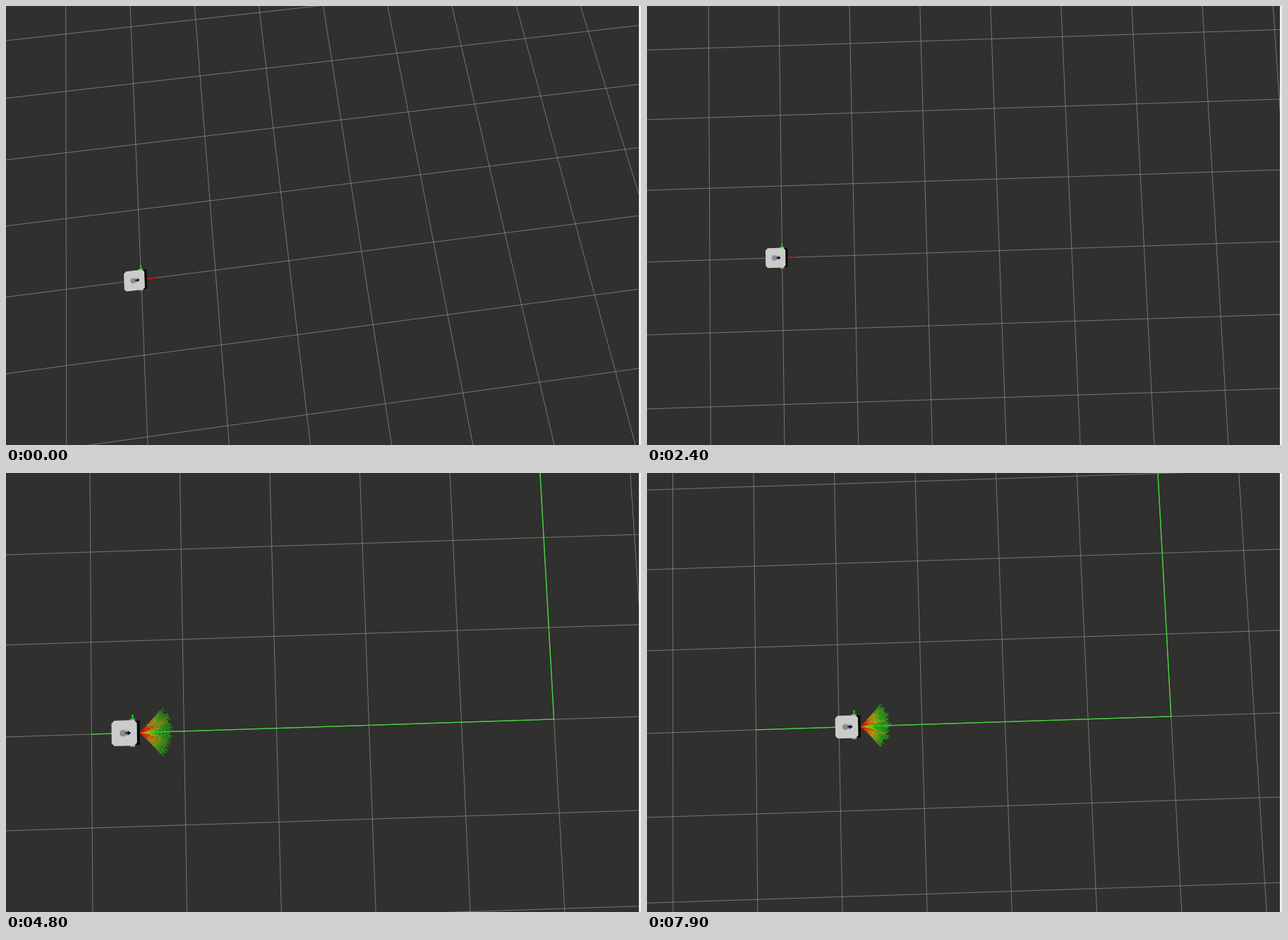
These frames come from a looping animation (900x622 px, 8000 ms). An HTML page with a canvas:

```html
<!DOCTYPE html>
<html lang="en">
<head>
<meta charset="utf-8">
<title>Robot path following</title>
<style>
  html, body { margin: 0; width: 100%; height: 100%; overflow: hidden; background: #30302e; }
  canvas { display: block; }
</style>
</head>
<body>
<canvas id="stage" width="900" height="622"></canvas>
<script>
const ctx = document.getElementById('stage').getContext('2d');
const LOOP = 8000, STEP = 100;
const VIEW_W = 897, VIEW_H = 622;

// Screen corners of the ground rectangle (0,-1) (5,-1) (5,2) (0,2).
const VIEWS = {
  tilted:  [195.9, 494.8, 730.7, 423.3, 664.4, 138.8, 183.9, 196.1],
  turned:  [255, 536.5, 736.7, 350.1, 623, 67.3, 149.6, 246.4],
  top:     [192.9, 459.8, 709.8, 443.1, 694.1, 138.6, 189, 154.9],
  near:    [122.2, 503, 784.1, 481.7, 762.1, 91.4, 119.7, 112.1],
  middle:  [155.6, 483, 749.3, 463.8, 730.2, 113.4, 152.3, 132.1]
};

const mix = (a, b, k) => a.map((v, i) => v + (b[i] - v) * k);
const clamp = (v, lo = 0, hi = 1) => Math.min(hi, Math.max(lo, v));

function cameraAt(t) {
  if (t < 1500) return mix(VIEWS.tilted, VIEWS.turned, clamp((t - 1000) / 500));
  if (t < 3700) return mix(VIEWS.turned, VIEWS.top, clamp((t - 1500) / 400));
  if (t < 3900 || t >= 5000) return VIEWS.middle;
  return VIEWS.near;
}

// Perspective map from ground cells to screen pixels.
function projector([x0, y0, x1, y1, x2, y2, x3, y3]) {
  const sx = x0 - x1 + x2 - x3, sy = y0 - y1 + y2 - y3;
  const ax = x1 - x2, ay = y1 - y2, bx = x3 - x2, by = y3 - y2;
  const det = ax * by - bx * ay;
  const g = (sx * by - bx * sy) / det, h = (ax * sy - sx * ay) / det;
  const a = x1 - x0 + g * x1, b = x3 - x0 + h * x3;
  const d = y1 - y0 + g * y1, e = y3 - y0 + h * y3;
  return (x, y) => {
    const u = x / 5, v = (y + 1) / 3, w = g * u + h * v + 1;
    return [(a * u + b * v + x0) / w, (d * u + e * v + y0) / w];
  };
}

function randomizer(seed) {
  return () => {
    seed = (seed + 0x6D2B79F5) | 0;
    let r = Math.imul(seed ^ (seed >>> 15), 1 | seed);
    r = (r + Math.imul(r ^ (r >>> 7), 61 | r)) ^ r;
    return ((r ^ (r >>> 14)) >>> 0) / 4294967296;
  };
}

function polyline(points, color, width) {
  ctx.strokeStyle = color;
  ctx.lineWidth = width;
  ctx.beginPath();
  points.forEach(p => ctx.lineTo(...p));
  ctx.stroke();
}

function drawGrid(project) {
  const color = 'rgba(160,160,158,0.62)';
  for (let x = -4; x <= 10; x++) polyline([project(x, -4), project(x, 6)], color, 1);
  for (let y = -4; y <= 6; y++) polyline([project(-4, y), project(10, y)], color, 1);
}

function drawRobot(project, x) {
  const o = project(x, 0);
  const [r, l] = [project(x + 0.5, 0), project(x - 0.5, 0)];
  const [u, d] = [project(x, 0.5), project(x, -0.5)];
  const rect = (color, left, bottom, w, h) => {
    ctx.fillStyle = color;
    ctx.fillRect(left, bottom, w, h);
  };
  ctx.save();
  ctx.transform(r[0] - l[0], r[1] - l[1], u[0] - d[0], u[1] - d[1], o[0], o[1]);
  rect('#8c8d8b', -0.03, -0.152, 0.055, 0.304);
  rect('#0ad80a', -0.009, 0.14, 0.018, 0.058);
  rect('#d80808', 0.07, -0.006, 0.13, 0.014);
  rect('#050505', 0.015, -0.13, 0.061, 0.26);

  const left = -0.229, right = 0.046, top = 0.137, cut = 0.03;
  ctx.fillStyle = '#cbccc9';
  ctx.beginPath();
  for (const [px, py] of [
    [left + cut, top], [right - cut, top], [right, top - cut], [right, cut - top],
    [right - cut, -top], [left + cut, -top], [left, cut - top], [left, top - cut]
  ]) ctx.lineTo(px, py);
  ctx.fill();

  rect('#969795', -0.1, -0.028, 0.055, 0.056);
  ctx.fillStyle = '#8a8b8a';
  ctx.beginPath();
  ctx.arc(-0.107, 0, 0.036, 0, 7);
  ctx.fill();
  rect('#15158c', -0.08, -0.01, 0.05, 0.02);
  ctx.fillStyle = '#08083c';
  ctx.beginPath();
  ctx.moveTo(-0.052, 0.024);
  ctx.lineTo(-0.018, 0);
  ctx.lineTo(-0.052, -0.024);
  ctx.fill();
  ctx.restore();
}

// Candidate trajectories, coloured from costly (red) to cheap (green).
function drawFan(project, x, seed) {
  const rand = randomizer(seed);
  const rays = 46, reach = 0.37, spread = 0.82;
  for (let i = 0; i <= rays; i++) {
    const angle = (i / rays * 2 - 1) * spread;
    const length = reach * (0.86 + 0.14 * rand());
    const center = Math.exp(-((angle / 0.16) ** 2));
    const bias = (rand() - 0.5) * 0.5;
    for (let s = 0.01; s < length; s += 0.0095) {
      const k = s / reach;
      const cost = k * 1.05 - 0.2 + center * 0.45 + bias * k + (rand() - 0.5) * 0.3;
      const a = angle * (0.9 + 0.1 * k);
      const [px, py] = project(x + 0.076 + s * Math.cos(a), s * Math.sin(a));
      ctx.fillStyle = `hsla(${clamp(cost * 1.5) * 112 + 4}, 88%, 45%, 0.85)`;
      ctx.fillRect(px - 0.5, py - 0.5, 1, 1);
    }
  }
}

function draw(t) {
  const project = projector(cameraAt(t));
  const robotX = Math.max(0, (t - 2935) * 0.0002385);
  ctx.fillStyle = '#30302e';
  ctx.fillRect(0, 0, VIEW_W, VIEW_H);
  drawGrid(project);
  if (t >= 2800) {
    polyline([project(0, 0), project(5, 0), project(5, 5)], '#43dc37', 1.3);
  }
  drawRobot(project, robotX);
  if (t >= 2800) drawFan(project, robotX, t);
  if (t >= 1100 && t < 2100) {
    ctx.fillStyle = '#8c8c0a';
    ctx.beginPath();
    ctx.arc(446.5, 310.5, 2.8, 0, 7);
    ctx.fill();
  }
  ctx.fillStyle = '#f0f0ef';
  ctx.fillRect(VIEW_W, 0, 3, VIEW_H);
}

const start = performance.now();
function tick() {
  const t = (performance.now() - start) % LOOP;
  draw(Math.floor(t / STEP) * STEP);
  requestAnimationFrame(tick);
}
tick();
</script>
</body>
</html>
```
